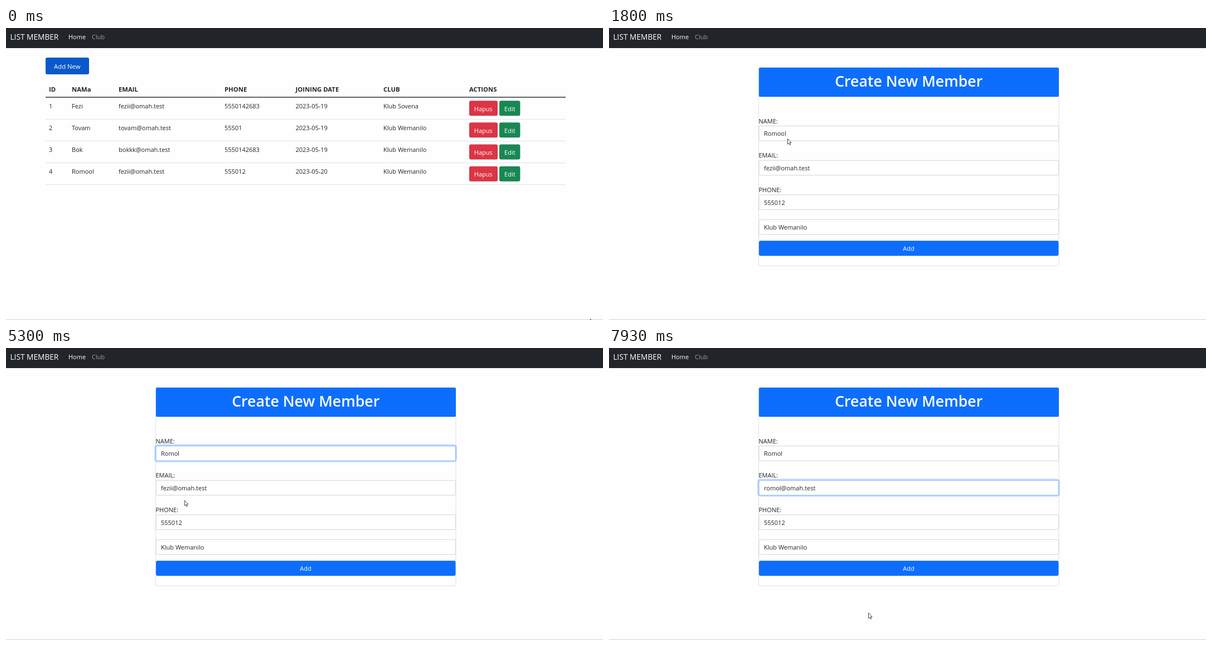
An HTML page for the animation above (7990 ms loop, 1071x523 px).

```html
<!DOCTYPE html>
<html lang="id">
<head>
<meta charset="utf-8">
<title>List Member</title>
<style>
html, body { margin: 0; width: 100%; height: 100%; overflow: hidden; background: #fefefe; }
svg { display: block; font: 11px "Open Sans", "Noto Sans", sans-serif; }
text { fill: #212529; }
.light { fill: #fff; }
.mid { text-anchor: middle; }
.head { font-weight: 700; font-size: 11.3px; }
</style>
</head>
<body>
<svg id="stage" width="1071" height="523" viewBox="0 0 1071 523"></svg>
<script>
const LOOP = 7990, FORM_AT = 1800, EDIT_CLICK = 1000, NAME_FOCUS = 2530, MAIL_FOCUS = 5570;
const stage = document.getElementById('stage');

function add(parent, tag, attrs, label) {
  const el = document.createElementNS('http://www.w3.org/2000/svg', tag);
  set(el, attrs);
  if (label) el.textContent = label;
  parent.append(el);
  return el;
}
function set(el, attrs) {
  for (const key in attrs) el.setAttribute(key, attrs[key]);
}
const show = (el, on) => el.setAttribute('display', on ? 'inline' : 'none');
const box = (parent, x, y, width, height, fill, more) =>
  add(parent, 'rect', { x, y, width, height, fill, ...more });
const text = (parent, x, y, label, more) => add(parent, 'text', { x, y, ...more }, label);
const inside = (p, r) => p.x >= r.x && p.x <= r.x + r.w && p.y >= r.y && p.y <= r.y + r.h;
const ramp = (t, start) => {
  const k = Math.max(0, Math.min(1, (t - start) / 150));
  return k * k * (3 - 2 * k);
};
const mix = (a, b, k) => `rgb(${a.map((v, i) => Math.round(v + (b[i] - v) * k))})`;
const lastOf = (steps, t) => steps.filter(s => s[0] <= t).pop();

// Page frame
box(stage, 0, 0, 1071, 523, '#fefefe');
box(stage, 0, 0, 1071, 36, '#212529');
text(stage, 7.5, 21, 'LIST MEMBER', { class: 'light', 'font-size': 13.7 });
text(stage, 112, 20.3, 'Home', { class: 'light' });
text(stage, 154, 20.3, 'Club', { style: 'fill:#9b9d9f' });
box(stage, 0, 522, 1071, 1, '#d2d2d2');

// Member list
const list = add(stage, 'g', {});
const columns = [77, 118, 202, 392, 519.5, 677, 831];
const members = [
  ['1', 'Fezi', 'fezii@omah.test', '5550142683', '2023-05-19', 'Klub Sovena'],
  ['2', 'Tovam', 'tovam@omah.test', '55501', '2023-05-19', 'Klub Wemanilo'],
  ['3', 'Bok', 'bokkk@omah.test', '5550142683', '2023-05-19', 'Klub Wemanilo'],
  ['4', 'Romool', 'fezii@omah.test', '555012', '2023-05-20', 'Klub Wemanilo']
];
box(list, 71, 53, 78, 30, '#0a58ca', { rx: 3 });
text(list, 109.8, 73, 'Add New', { class: 'light mid', 'font-size': 11.3 });
['ID', 'NAMa', 'EMAIL', 'PHONE', 'JOINING DATE', 'CLUB', 'ACTIONS'].forEach((label, i) =>
  text(list, columns[i], 113.5, label, { class: 'head' }));
box(list, 71, 123.3, 933, 1.4, '#212529');

const edits = members.map((cells, i) => {
  const y = 130.2 + i * 39.15;
  cells.forEach((cell, c) => text(list, columns[c], y + 13.6, cell));
  box(list, 831, y, 51, 27, '#dc3545', { rx: 3 });
  text(list, 856.3, y + 18.3, 'Hapus', { class: 'light mid' });
  const ring = box(list, 883.4, y - 1.4, 40.6, 29.8, 'none',
    { rx: 4, stroke: '#3c996e', 'stroke-width': 2.8, opacity: 0 });
  const face = box(list, 885, y, 37.4, 27, '#198754', { rx: 3 });
  text(list, 903.8, y + 18.3, 'Edit', { class: 'light mid' });
  box(list, 71, Math.round(y + 32.8), 933, 1, '#dee2e6');
  return { ring, face, area: { x: 885, y, w: 37.4, h: 27 } };
});

// Member form
const form = add(stage, 'g', {});
box(form, 268.5, 70.5, 538.5, 355.5, 'none', { rx: 3, stroke: '#dfdfdf' });
box(form, 269, 71, 538, 52.3, '#0d6efd', { rx: 2 });
text(form, 537.7, 105, 'Create New Member', { class: 'light mid', 'font-size': 26.7, 'font-weight': 600 });

function field(y, label, value) {
  if (label) text(form, 268.5, y - 4.3, label);
  const ring = box(form, 267.4, y - 1.1, 540.2, 29.2, 'none',
    { rx: 4, stroke: '#0d6efd', 'stroke-width': 2.8, opacity: 0 });
  const frame = box(form, 269, y + .5, 537.5, 26.5, '#fff', { rx: 2.5, stroke: '#ced4da' });
  const mark = box(form, 278, y + 6, 0, 16, '#0078d7');
  const line = text(form, 278, y + 18.3, '');
  const head = add(line, 'tspan', {}, value);
  const tail = add(line, 'tspan', {});
  const caret = box(form, 278, y + 6, 1, 16, '#212529', { display: 'none' });
  return { ring, frame, mark, line, head, tail, caret, area: { x: 269, y, w: 538, h: 27.5 } };
}
const nameField = field(175, 'NAME:', 'Romool');
const mailField = field(236.7, 'EMAIL:', 'fezii');
field(298.3, 'PHONE:', '555012');
field(342.8, '', 'Klub Wemanilo');
const squiggle = add(form, 'path', { fill: 'none', stroke: '#e03030', 'stroke-width': .9 });
box(form, 269, 381, 537.5, 27, '#0d6efd', { rx: 3 });
text(form, 537.5, 399.3, 'Add', { class: 'light mid' });

// Mouse
const arrow = add(stage, 'path', {
  d: 'M0 0V9.6L2.2 7.6L3.7 11L5.3 10.3L3.8 7H6.6Z',
  fill: '#fff', stroke: '#33353b', 'stroke-width': .9, 'stroke-linejoin': 'round'
});
const beam = add(stage, 'path', {
  d: 'M-2 -7H-.5L0 -6.5L.5 -7H2M0 -6.5V6.5M-2 7H-.5L0 6.5L.5 7H2',
  fill: 'none', stroke: '#3c3c3c', 'stroke-width': .9
});
// time, x, y
const path = [
  [0, 1048, 521], [70, 1046, 513], [450, 960, 330], [640, 918, 226], [830, 906, 257],
  [1380, 904, 259], [1500, 850, 243], [1590, 745, 228], [1660, 629, 219], [1719, 629, 219],
  [1720, 433, 220], [1799, 433, 220], [1800, 320, 198], [1860, 320, 198], [2460, 313, 189],
  [2929, 313, 189], [2930, 309, 165], [3000, 302, 146], [4940, 302, 146], [5150, 326, 255],
  [5240, 330, 283], [5430, 298, 250], [6019, 298, 250], [6020, 319, 223], [6850, 319, 223],
  [7170, 283, 193], [7779, 283, 193], [7780, 335, 290], [7850, 425, 425], [7930, 465, 474]
];
function mouseAt(t) {
  const i = path.findIndex(k => k[0] > t);
  if (i < 0) return { x: 465, y: 474 };
  const [t0, x0, y0] = path[i - 1], [t1, x1, y1] = path[i];
  const k = (t - t0) / (t1 - t0);
  return { x: x0 + (x1 - x0) * k, y: y0 + (y1 - y0) * k };
}

// time, value, caret position (0 hides it)
const nameSteps = [
  [0, 'Romool', 0], [NAME_FOCUS, 'Romool', 5], [3280, 'Romool', 0], [3680, 'Romoool', 6],
  [4210, 'Romool', 5], [4280, 'Romol', 4], [4410, 'Romol', 0], [4740, 'Romol', 4], [5240, 'Romol', 0]
];
const mailSteps = [
  [0, 'fezii', 0], [MAIL_FOCUS, 'fezii', 5], [6170, 'fezii', 0], [6770, 'r', 1], [6850, 'ro', 2],
  [7010, 'rom', 3], [7100, 'romo', 4], [7250, 'romol', 5], [7780, 'romol', 0]
];

function type(f, [, value, caret], rest) {
  f.head.textContent = value;
  f.tail.textContent = rest;
  show(f.caret, caret > 0);
  if (caret) f.caret.setAttribute('x', Math.round(278 + f.line.getSubStringLength(0, caret)));
}
function focus(f, k) {
  f.ring.setAttribute('opacity', .25 * k);
  f.frame.setAttribute('stroke', mix([206, 212, 218], [134, 183, 254], k));
}

function drawList(t, mouse) {
  edits.forEach(({ ring, face, area }, i) => {
    const k = i === 3 ? ramp(t, EDIT_CLICK) : 0;
    const base = inside(mouse, area) ? [21, 115, 71] : [25, 135, 84];
    face.setAttribute('fill', mix(base, [20, 108, 67], k));
    ring.setAttribute('opacity', .5 * k);
  });
}
function drawForm(t) {
  const toMail = ramp(t, MAIL_FOCUS);
  focus(nameField, ramp(t, NAME_FOCUS) * (1 - toMail));
  focus(mailField, toMail);
  type(nameField, lastOf(nameSteps, t), '');
  type(mailField, lastOf(mailSteps, t), '@omah.test');

  const selected = t >= 6440 && t < 6770;
  mailField.head.style.fill = selected ? '#fff' : '';
  mailField.mark.setAttribute('width', selected ? mailField.line.getSubStringLength(0, 5) : 0);

  const misspelt = t >= NAME_FOCUS && t < 3680;
  show(squiggle, misspelt);
  if (misspelt) {
    const waves = Math.round(nameField.line.getComputedTextLength() / 3);
    squiggle.setAttribute('d', 'M278 195.6' + 'l1.5 -1.2l1.5 1.2'.repeat(waves));
  }
}

function draw(t) {
  const onForm = t >= FORM_AT;
  const mouse = mouseAt(t);
  show(list, !onForm);
  show(form, onForm);
  if (onForm) drawForm(t); else drawList(t, mouse);

  const overText = t > 1870 && [nameField, mailField].some(f => inside(mouse, f.area));
  show(beam, overText);
  show(arrow, !overText);
  set(overText ? beam : arrow, { transform: `translate(${mouse.x + .5} ${mouse.y + .5})` });
}

const start = performance.now();
function tick() {
  draw((performance.now() - start) % LOOP);
  requestAnimationFrame(tick);
}
tick();
</script>
</body>
</html>
```
